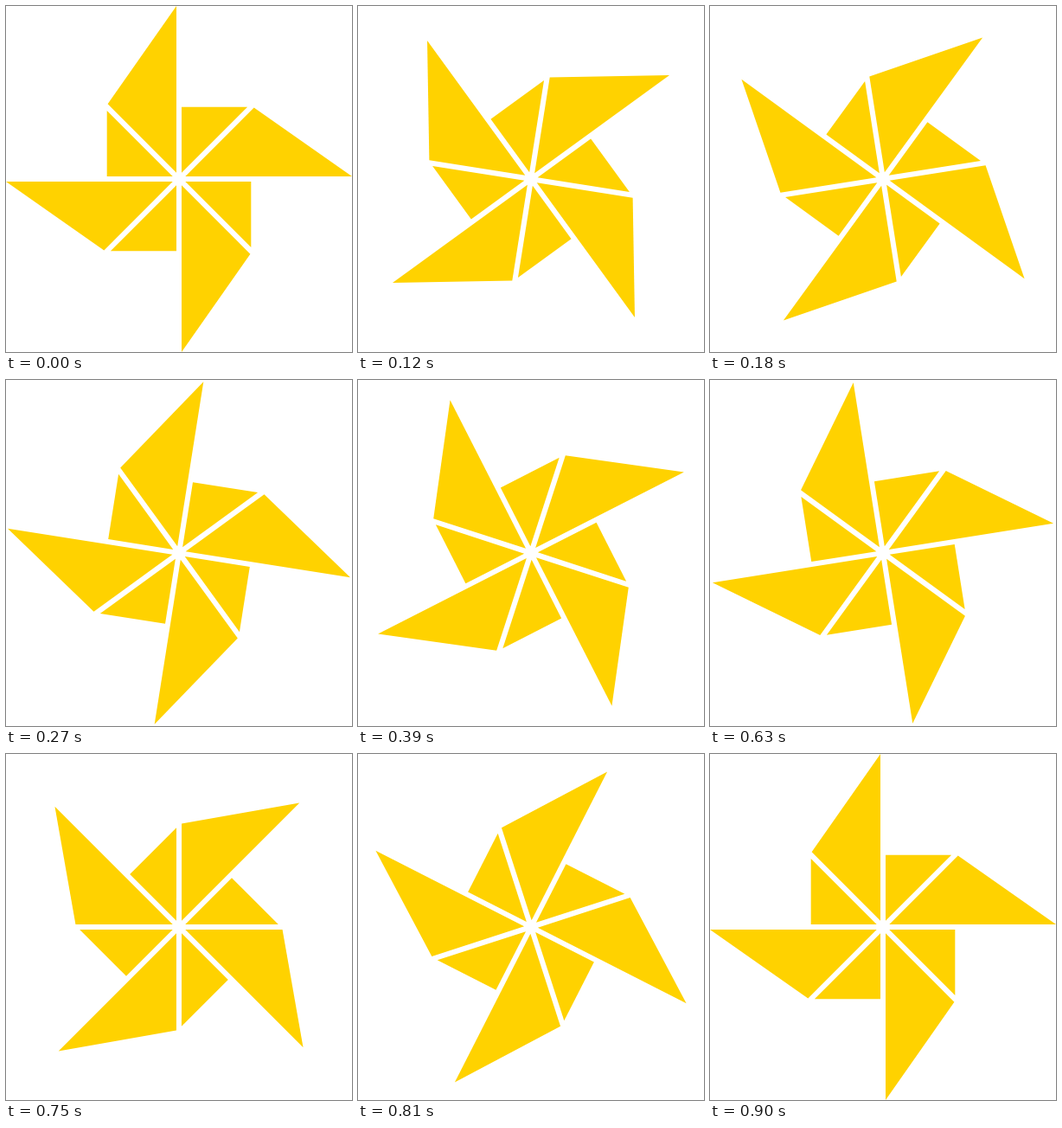
Write an HTML page with a canvas that moves like this. It is 400x400 px and loops after 0.93 s.

```html
<!DOCTYPE html>
<html lang="en">
<head>
<meta charset="utf-8">
<title>Pinwheel</title>
<style>
  html, body { margin: 0; width: 100%; height: 100%; overflow: hidden; background: #fff; }
  canvas { display: block; }
</style>
</head>
<body>
<canvas id="stage" width="400" height="400"></canvas>
<script>
const ctx = document.getElementById('stage').getContext('2d');
const SIZE = 400;
const STEP_MS = 30;
const STEPS = 31; // the last step repeats the first pose
const STEP_ANGLE = -Math.PI / 20;

// One quarter of the wheel, relative to the hub.
const BLADE = [[-3, -200], [-82.4, -86.7], [-3, -7.3]];
const FOLD = [[-83.3, -79.1], [-83.3, -3], [-7.3, -3]];

function fillPolygon(points) {
  ctx.beginPath();
  for (const [x, y] of points) ctx.lineTo(x, y);
  ctx.closePath();
  ctx.fill();
}

function draw(time) {
  const step = Math.floor(time / STEP_MS + 1e-6) % STEPS;
  ctx.setTransform(1, 0, 0, 1, 0, 0);
  ctx.fillStyle = '#fff';
  ctx.fillRect(0, 0, SIZE, SIZE);
  ctx.translate(SIZE / 2, SIZE / 2);
  ctx.rotate(step * STEP_ANGLE);
  ctx.fillStyle = '#ffd200';
  for (let quarter = 0; quarter < 4; quarter++) {
    fillPolygon(BLADE);
    fillPolygon(FOLD);
    ctx.rotate(Math.PI / 2);
  }
}

function tick() {
  draw(performance.now());
  requestAnimationFrame(tick);
}
tick();
</script>
</body>
</html>
```
